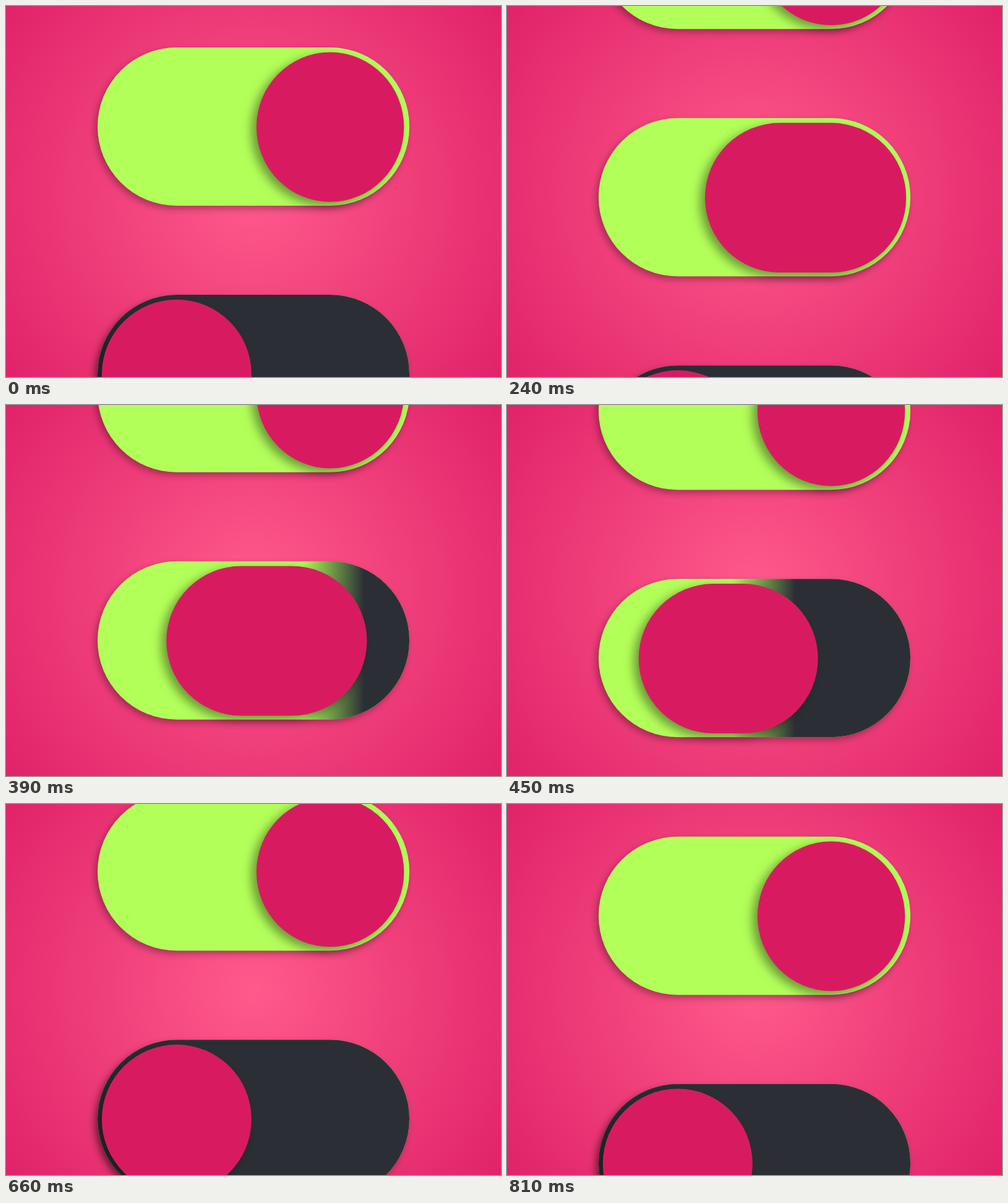
Recreate the animation shown at these times as an HTML page with a canvas. Size 800 by 600 pixels, loop 0.84 s.

```html
<!DOCTYPE html>
<html lang="en">
<head>
<meta charset="utf-8">
<title>Toggle switches</title>
<style>
  html, body { margin: 0; width: 100%; height: 100%; overflow: hidden; }
  canvas { display: block; }
</style>
</head>
<body>
<canvas id="stage" width="800" height="600"></canvas>
<script>
const ctx = document.getElementById('stage').getContext('2d');
const LOOP = 840, STEP = 30, SPACING = 400;
const GREEN = '#b2ff59', DARK = '43,47,53', PINK = '#d81b60';

const backdrop = ctx.createRadialGradient(400, 300, 0, 400, 300, 500);
backdrop.addColorStop(0, '#ff5a8c');
backdrop.addColorStop(1, '#e02369');

const clamp = x => Math.min(1, Math.max(0, x));
const mix = (a, b, p) => a + (b - a) * p;
const smooth = u => u * u * (3 - 2 * u);

// Linear from a to b until t1, then eased from b to c until t2.
function travel(age, a, b, c, t1, t2) {
  return age < t1
    ? mix(a, b, clamp(age / t1))
    : mix(b, c, smooth(clamp((age - t1) / (t2 - t1))));
}

function pill(x, y, w, h, fill, shadow) {
  ctx.save();
  if (shadow) {
    ctx.shadowColor = `rgba(0,0,0,${shadow.alpha})`;
    ctx.shadowOffsetX = shadow.x;
    ctx.shadowOffsetY = shadow.y;
    ctx.shadowBlur = shadow.blur;
  }
  const rx = Math.min(h, w) / 2, ry = h / 2;
  ctx.beginPath();
  ctx.ellipse(x + rx, y + ry, rx, ry, 0, Math.PI / 2, Math.PI * 1.5);
  ctx.ellipse(x + w - rx, y + ry, rx, ry, 0, -Math.PI / 2, Math.PI / 2);
  ctx.closePath();
  ctx.fillStyle = fill;
  ctx.fill();
  ctx.restore();
}

function drawToggle(age) {
  const y = 67 + age * SPACING / LOOP;
  const center = travel(age, 524, 472.2, 275.8, 300, 570);
  const width = travel(age, 238.5, 349, 242, 306, 575);
  const wipe = 642 - 1.89 * (age - 330);

  pill(148, y, 504, 256, GREEN, { x: -4, y: 5, blur: 11, alpha: 0.3 });
  if (wipe < 702) {
    const dark = ctx.createLinearGradient(wipe - 50, 0, wipe + 50, 0);
    dark.addColorStop(0, `rgba(${DARK},0)`);
    dark.addColorStop(1, `rgba(${DARK},1)`);
    pill(148, y, 504, 256, dark);
  }
  pill(center - width / 2, y + 7.8, width, 242, PINK, { x: -8, y: 6, blur: 16, alpha: 0.4 });
}

function draw() {
  const time = Math.floor((performance.now() + 1) / STEP) * STEP % LOOP;
  ctx.fillStyle = backdrop;
  ctx.fillRect(0, 0, 800, 600);
  for (const turn of [-1, 0, 1]) drawToggle(time + turn * LOOP);
  requestAnimationFrame(draw);
}
draw();
</script>
</body>
</html>
```
